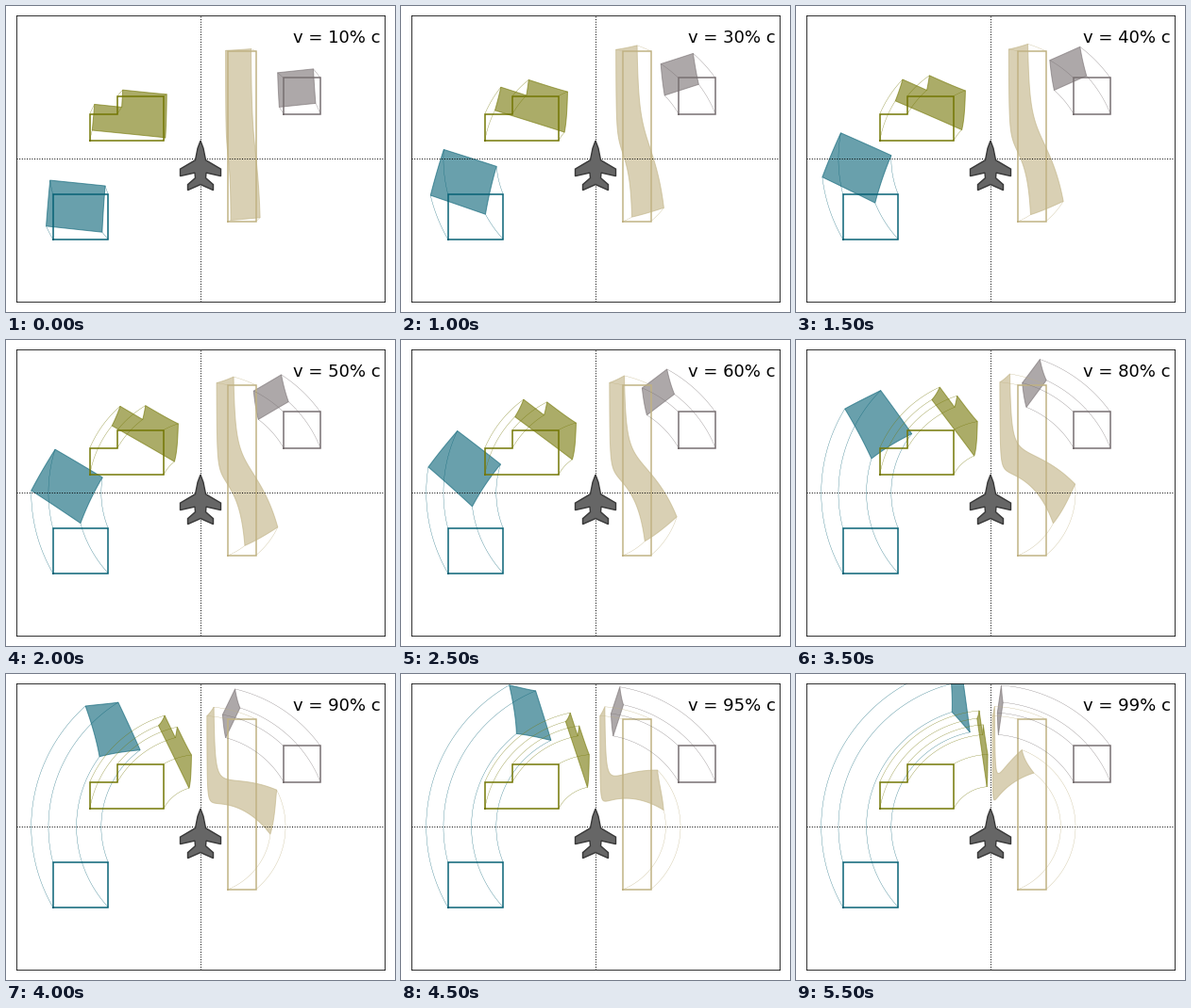
Write a matplotlib script that moves like this. It is 412x325 px and loops after 6000 ms.

```python
import numpy as np
import matplotlib.pyplot as plt
from matplotlib.animation import FuncAnimation

W, H, DPI = 412, 325, 72
UNIT_X, UNIT_Y = 19.53, 19.035  # pixels per axis unit
CENTRE_X, CENTRE_Y = 206, H - 162.13
N_FRAMES = 12


def speed_percent(frame):
    """Steps of 10 up to 90, then the gap to light speed halves each time."""
    step = frame + 1
    return 10 * step if step < 10 else round(100 - 10 / 2 ** (step - 9))


def box(x, y, width, height):
    return [(x, y), (x + width, y), (x + width, y + height), (x, y + height)]


def notched_box(x, y, width, height, notch_width, notch_height):
    top = y + height
    return box(x, y, width, height)[:3] + [
        (x + notch_width, top), (x + notch_width, top - notch_height),
        (x, top - notch_height)]


def fin(y, span, drop, chord):
    return [(5.5, y), (span, y - drop), (span, y - drop - chord)]


def aberrate(x, y, beta):
    """Rotate the line of sight towards +y; the distance stays the same."""
    r = np.hypot(x, y)
    half = np.arctan2(x, y) / 2
    angle = 2 * np.arctan(np.sqrt((1 - beta) / (1 + beta)) * np.tan(half))
    return r * np.sin(angle), r * np.cos(angle)


def densify(corners, n=60):
    ends = corners[1:] + corners[:1]
    t = np.linspace(0, 1, n, endpoint=False)[:, None]
    return np.vstack([(1 - t) * np.array(a) + t * np.array(b)
                      for a, b in zip(corners, ends)])


plt.rcParams["font.family"] = "DejaVu Sans"
fig = plt.figure(figsize=(W / DPI, H / DPI), dpi=DPI, facecolor="white")
ax = fig.add_axes([(CENTRE_X - 10 * UNIT_X) / W, (CENTRE_Y - 8 * UNIT_Y) / H,
                   20 * UNIT_X / W, 16 * UNIT_Y / H])
ax.set(xlim=(-10, 10), ylim=(-8, 8), xticks=[], yticks=[])
ax.axhline(0, color="k", ls=":", lw=1)
ax.axvline(0, color="k", ls=":", lw=1)

SHAPES = [
    (box(-8, -4.5, 3, 2.5), "#066175"),
    (notched_box(-6, 1, 4, 2.5, 1.5, 1), "#737603"),
    (box(1.5, -3.5, 1.5, 9.5), "#c0b283"),
    (box(4.5, 2.5, 2, 2), "#776f71"),
]

moving = []
for corners, color in SHAPES:
    outline = densify(corners)
    patch, = ax.fill(*outline.T, color=color, alpha=0.6, lw=1)
    ax.plot(*zip(*corners, corners[0]), color=color, lw=1.5,
            solid_joinstyle="miter")
    trails = [ax.plot([], [], color=color, lw=0.3)[0] for _ in corners]
    moving.append((corners, outline, patch, trails))

# Right half of the aircraft in pixels from the centre, then mirrored
half_plane = np.array([(0, 19), (3, 11), *fin(-1.5, 21.5, 9.5, 7.5), (6, -15),
                       *fin(-20.5, 13.5, 7, 6), (0, -27.5)])
plane = np.vstack([half_plane, half_plane[-2:0:-1] * [-1, 1]])
ax.fill(*(plane / [UNIT_X, UNIT_Y]).T, facecolor="#666666",
        edgecolor="#383838", lw=1.4, zorder=3)

label = ax.text(5, 6.48, "", fontsize=18)


def draw(frame):
    percent = speed_percent(frame)
    beta = percent / 100
    label.set_text(f"v = {percent}% c")
    # Even steps in rapidity keep the trails smooth near light speed
    history = np.tanh(np.linspace(0, np.arctanh(beta), 100))
    artists = [label]
    for corners, outline, patch, trails in moving:
        patch.set_xy(np.column_stack(aberrate(*outline.T, beta)))
        for (x, y), trail in zip(corners, trails):
            trail.set_data(*aberrate(x, y, history))
        artists += [patch, *trails]
    return artists


anim = FuncAnimation(fig, draw, frames=N_FRAMES, interval=500,
                     repeat=True, repeat_delay=0)
plt.show()
```
